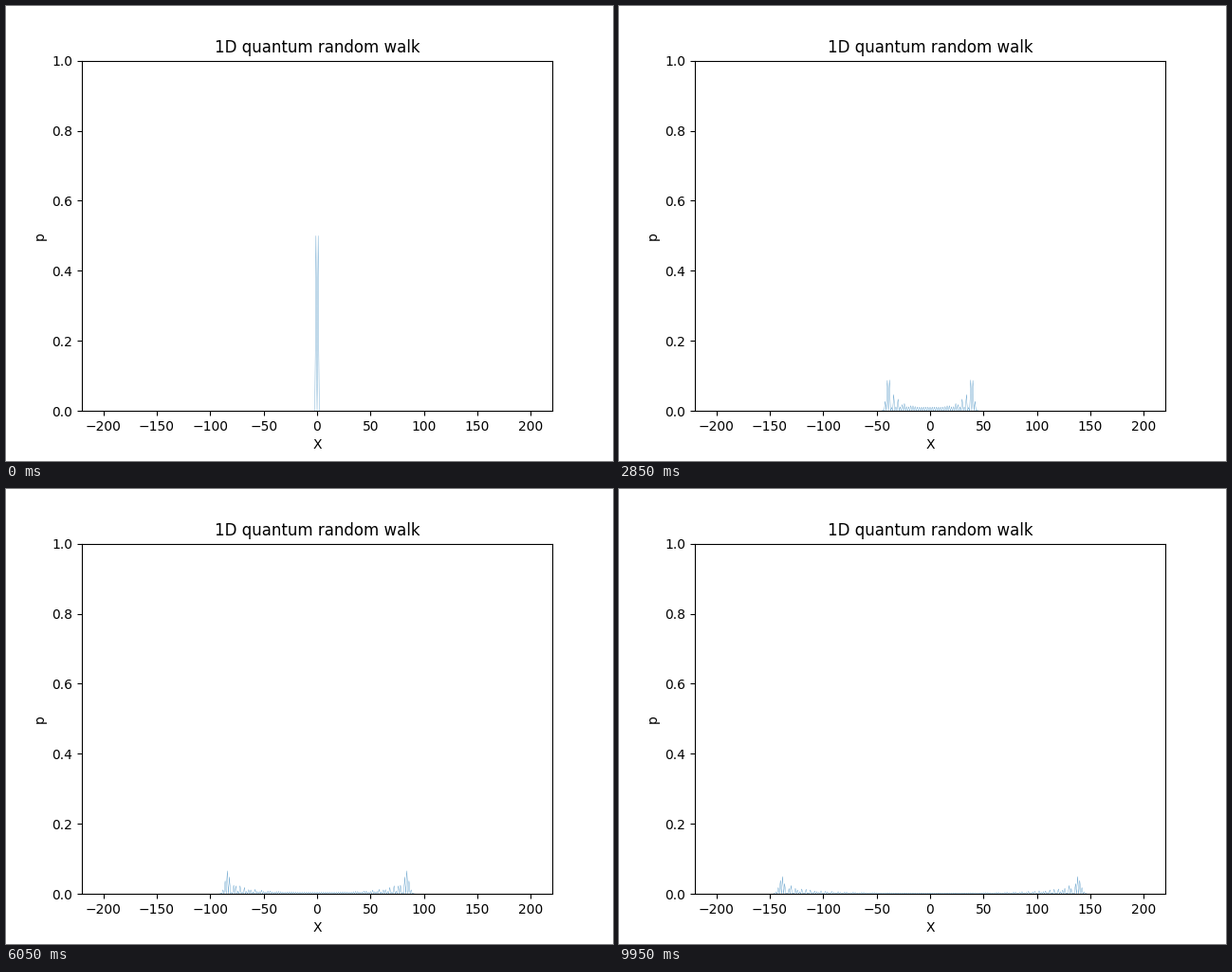
A matplotlib script that plays this animation: 640 px wide and 480 px high, repeating every 10 s.

```python
import numpy as np
import matplotlib.pyplot as plt
from matplotlib.animation import FuncAnimation

STEPS = 200
INTERVAL = 50  # ms


def walk(steps):
    """Position probabilities of a Hadamard walk after each step."""
    size = 2 * steps + 1
    left = np.zeros(size, dtype=complex)
    right = np.zeros(size, dtype=complex)
    left[steps] = 1 / np.sqrt(2)
    right[steps] = 1j / np.sqrt(2)
    history = []
    for _ in range(steps):
        heads = (left + right) / np.sqrt(2)
        tails = (left - right) / np.sqrt(2)
        left = np.roll(heads, -1)
        right = np.roll(tails, 1)
        history.append(abs(left) ** 2 + abs(right) ** 2)
    return history


x = np.arange(-STEPS, STEPS + 1)
probs = walk(STEPS)

fig, ax = plt.subplots(figsize=(6.4, 4.8), dpi=100)
ax.set_xlim(-220, 220)
ax.set_ylim(0, 1)
ax.set_title("1D quantum random walk")
ax.set_xlabel("X")
ax.set_ylabel("p")
line, = ax.plot(x, probs[0], color="tab:blue", linewidth=0.2)


def update(i):
    line.set_ydata(probs[i])
    return line,


anim = FuncAnimation(fig, update, frames=STEPS, interval=INTERVAL,
                     repeat=True, repeat_delay=0)
plt.show()
```
